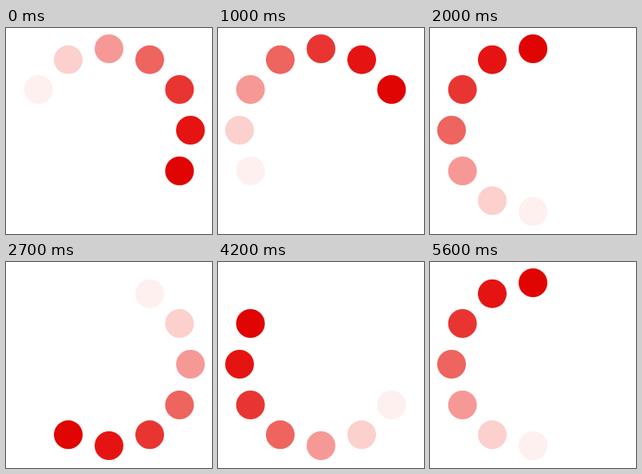
Animation of 258 by 258 pixels, one loop 5.7 s. Source, as an HTML page with a canvas:

```html
<!DOCTYPE html>
<html lang="en">
<head>
<meta charset="utf-8">
<title>Loading spinner</title>
<style>
  html, body { margin: 0; width: 100%; height: 100%; overflow: hidden; background: #fff; }
  canvas { display: block; width: 258px; height: 258px; }
</style>
</head>
<body>
<canvas id="stage" width="258" height="258"></canvas>
<script>
const ctx = document.getElementById('stage').getContext('2d');
const STEP = 100, LOOP = 5700;
const SLOTS = 12, START = 4;
const CX = 129, CY = 128, RING = 102, DOT = 18;
// Head of the trail first, fading towards the tail
const SHADES = ['#e00402', '#e51412', '#e93531', '#ee645f', '#f69996', '#fcd0cd', '#fef0ef'];

function dot(slot, color) {
  const a = (slot / SLOTS) * Math.PI * 2 - Math.PI / 2;
  ctx.fillStyle = color;
  ctx.beginPath();
  ctx.arc(CX + RING * Math.cos(a), CY + RING * Math.sin(a), DOT, 0, Math.PI * 2);
  ctx.fill();
}

function draw(time) {
  const head = START + Math.floor((time % LOOP) / STEP);
  ctx.fillStyle = '#fff';
  ctx.fillRect(0, 0, 258, 258);
  SHADES.forEach((color, i) => dot(head - i, color));
}

const begin = performance.now();
function tick() {
  draw(performance.now() - begin);
  requestAnimationFrame(tick);
}
tick();
</script>
</body>
</html>
```
